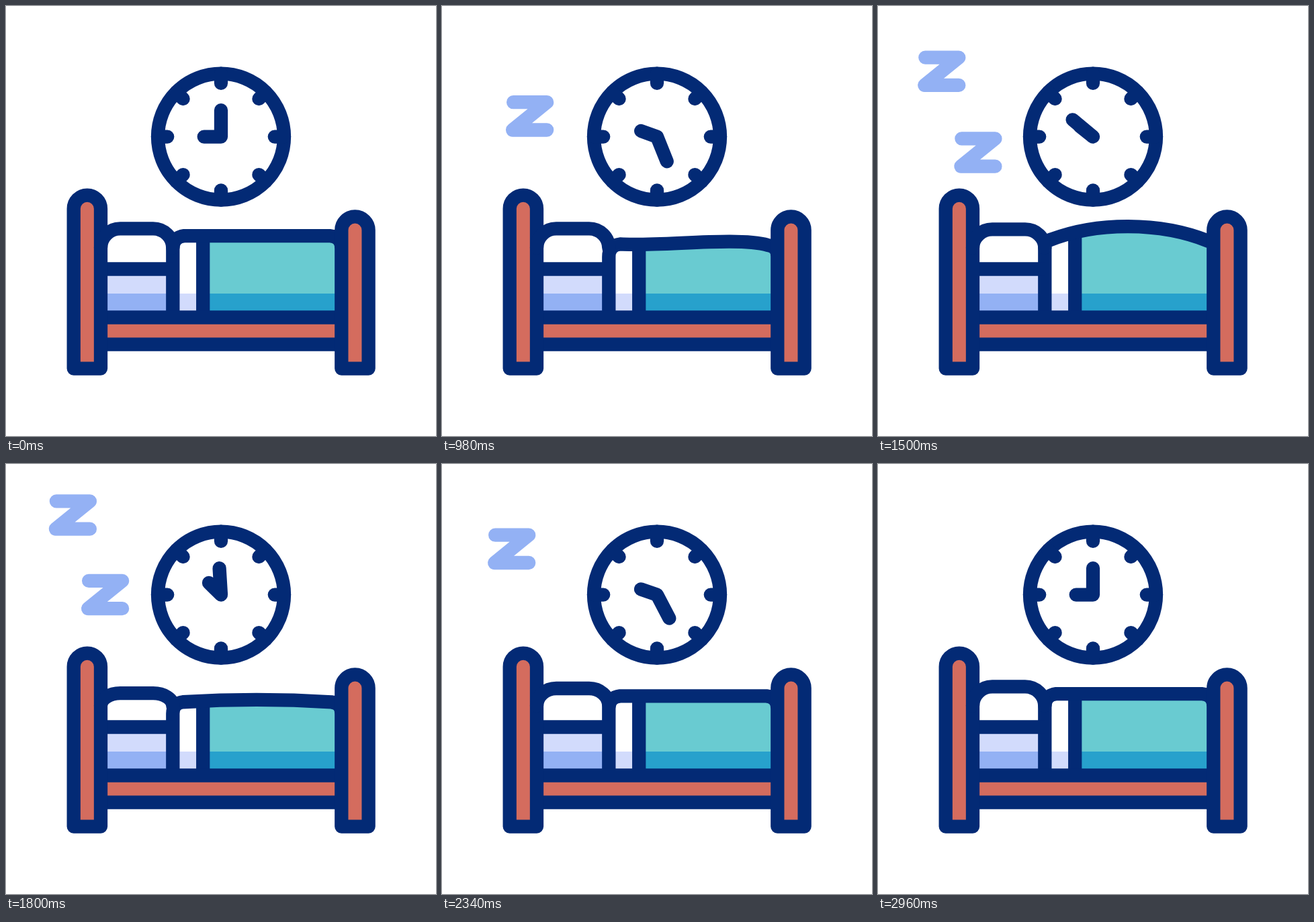
An HTML page for the animation above (3.6 s loop, 640 by 640 pixels).

```html
<!DOCTYPE html>
<html lang="en">
<head>
<meta charset="utf-8">
<title>Bedtime</title>
<style>
  html, body { margin: 0; width: 100%; height: 100%; overflow: hidden; background: #fff; }
  svg { display: block; width: 100%; height: 100%; }
  .ink { fill: none; stroke: #032a75; stroke-width: 20.3; stroke-linejoin: round; }
  .round { stroke-linecap: round; }
  .post { fill: #d46c5e; }
  .z { fill: none; stroke: #93b1f4; stroke-width: 20.3; stroke-linecap: round; stroke-linejoin: round; }
</style>
</head>
<body>
<svg viewBox="0 0 640 640">
  <defs><clipPath id="coverClip"><path id="coverShape"/></clipPath></defs>

  <path class="z" d="M11.3 10.2H61.3L10.3 51.5H61.3"/>
  <path class="z" d="M11.3 10.2H61.3L10.3 51.5H61.3"/>

  <g class="ink round">
    <circle cx="320" cy="194.6" r="94"/>
    <g id="ticks"></g>
    <path id="hands"/>
  </g>

  <rect x="141" y="391" width="107" height="37" fill="#d2dbfc"/>
  <rect x="141" y="428" width="107" height="36" fill="#93b1f4"/>

  <g clip-path="url(#coverClip)">
    <rect x="248" y="300" width="45" height="164" fill="#fff"/>
    <rect x="248" y="428" width="45" height="36" fill="#d2dbfc"/>
    <rect x="293" y="300" width="207" height="164" fill="#69cbd1"/>
    <rect x="293" y="428" width="207" height="36" fill="#27a1cc"/>
    <path class="ink" d="M293.2 300V464"/>
  </g>
  <path id="cover" class="ink"/>

  <rect x="141" y="463" width="358" height="40" fill="#d46c5e"/>
  <path class="ink" d="M141 463.5H499M141 503.6H499M141 391.5H248"/>
  <path class="ink post" d="M100.7 539.6V301.8a20.15 20.15 0 0 1 40.3 0V539.6Z"/>
  <path class="ink post" d="M499.3 539.6V333.6a20.15 20.15 0 0 1 40.3 0V539.6Z"/>
  <path id="pillow" class="ink round"/>
</svg>
<script>
  const LOOP = 3600;
  const byId = id => document.getElementById(id);
  const clamp = v => Math.min(1, Math.max(0, v));
  const smooth = u => u * u * (3 - 2 * u);
  const easeIn = u => u * u;
  const easeOut = u => u * (2 - u);
  const progress = (t, from, to) => clamp((t - from) / (to - from));
  const ramp = (t, from, to) => smooth(progress(t, from, to));
  // Rises from a to b, then falls back from b to c.
  const swing = (t, a, b, c) => t < b ? ramp(t, a, b) : 1 - ramp(t, b, c);

  const CENTER = [320, 194.6];
  function polar(degrees, radius) {
    const a = degrees * Math.PI / 180;
    return [CENTER[0] + radius * Math.sin(a), CENTER[1] - radius * Math.cos(a)];
  }

  byId('ticks').innerHTML = Array.from({ length: 8 }, (_, i) =>
    `<path d="M${polar(i * 45, 94)}L${polar(i * 45, 79.8)}"/>`).join('');

  function drawClock(t) {
    const turn = swing(t, 200, 1900, 2700);
    byId('hands').setAttribute('d',
      `M${polar(360 * turn, 39.5)}L${CENTER}L${polar(270 + 45 * turn, 25.3)}`);
  }

  // Top edge of the cover: left corner end, two curve controls, right corner start.
  const flat = y => [265, y, 337, y, 411, y, 483, y];
  const bump = [265, 354.5, 330, 358, 439, 343.4, 485, 356];
  const dome = [254, 349, 325, 321, 420, 321, 492, 350];
  const coverKeys = [
    [200, flat(342.2)],
    [620, flat(355.2), smooth],
    [980, bump, easeIn],
    [1500, dome, easeOut],
    [1900, flat(355.2), smooth],
    [2550, flat(342.2), smooth]
  ];

  function coverPose(t) {
    const next = coverKeys.findIndex(key => key[0] > t);
    if (next === 0) return coverKeys[0][1];
    if (next < 0) return coverKeys[coverKeys.length - 1][1];
    const [from, a] = coverKeys[next - 1];
    const [to, b, ease] = coverKeys[next];
    const u = ease(progress(t, from, to));
    return a.map((v, i) => v + (b[i] - v) * u);
  }

  function drawCover(t) {
    const [lx, ly, ax, ay, bx, by, rx, ry] = coverPose(t);
    const leftDrop = lx - 248, rightDrop = 499.3 - rx;
    const d = `M248.3 464V${ly + leftDrop + 2}Q248.3 ${ly + 2} ${lx} ${ly}` +
      `C${ax} ${ay} ${bx} ${by} ${rx} ${ry}Q499.3 ${ry + 2} 499.3 ${ry + rightDrop + 2}`;
    byId('cover').setAttribute('d', d);
    byId('coverShape').setAttribute('d', d + 'V464Z');
  }

  function drawPillow(t) {
    const top = 331.3 + 11 * swing(t, 1400, 1900, 2550);
    const bend = top + (360 - top) * 0.45;
    byId('pillow').setAttribute('d',
      `M141 360C141 ${bend} 154 ${top} 170 ${top}H219C235 ${top} 248.3 ${bend} 248.3 360`);
  }

  const letters = document.querySelectorAll('.z');
  function drawLetter(node, age) {
    const life = 1680, fade = 80;
    const e = ramp(age, 0, life);
    const y = 193 - 122 * e - 27 * e * e;
    const x = 86.5 + 27.5 * Math.sin((y - 122) * Math.PI / 112);
    node.setAttribute('transform', `translate(${x} ${y})`);
    node.setAttribute('opacity', clamp(Math.min(age, life - age) / fade));
  }

  function render(t) {
    drawClock(t);
    drawCover(t);
    drawPillow(t);
    letters.forEach((node, i) => drawLetter(node, t - 200 - i * 1080));
  }

  const start = performance.now();
  function tick() {
    render((performance.now() - start) % LOOP);
    requestAnimationFrame(tick);
  }
  render(0);
  requestAnimationFrame(tick);
</script>
</body>
</html>
```
